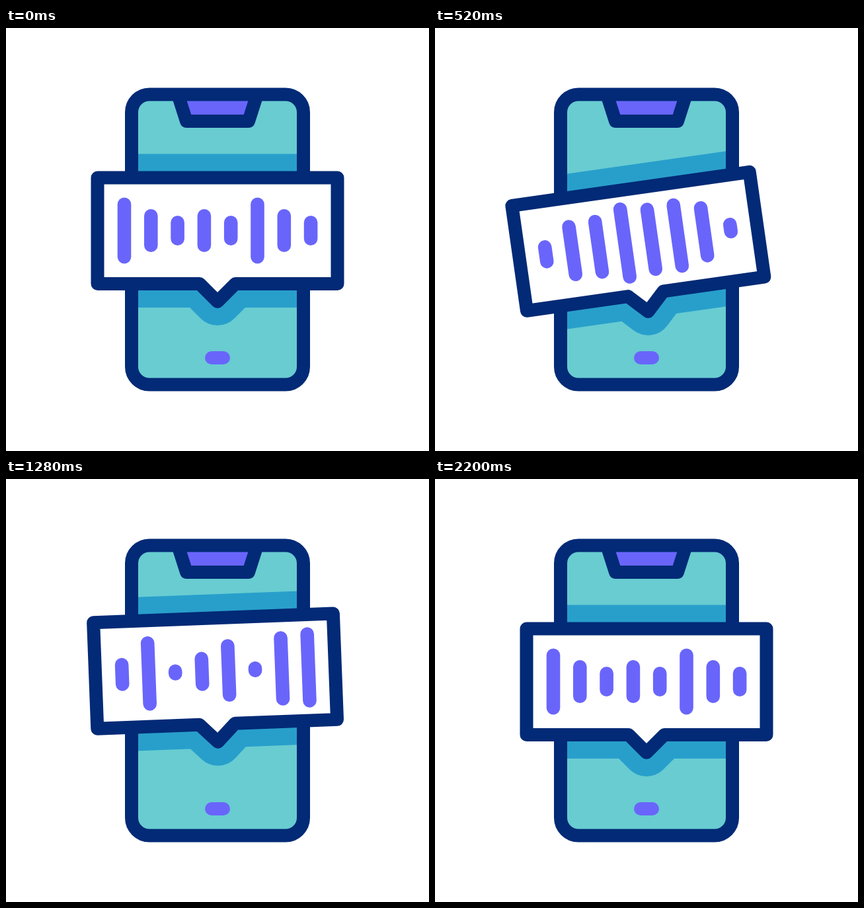
An HTML page with a canvas that plays this animation: 640x640 px, repeating every 2400 ms.

```html
<!DOCTYPE html>
<html lang="en">
<head>
<meta charset="utf-8">
<title>Voice message</title>
<style>
  html, body { margin: 0; width: 100%; height: 100%; overflow: hidden; background: #fff; }
  canvas { display: block; width: 640px; height: 640px; }
</style>
</head>
<body>
<canvas id="stage" width="640" height="640"></canvas>
<script>
const ctx = document.getElementById('stage').getContext('2d');
const NAVY = '#022a76', TEAL = '#68ccd1', BLUE = '#289fcb', PURPLE = '#6965fb';
const LOOP = 2400, REST = 2200;
const PIVOT = { x: 320, y: 396.5 };

// Swings and hops of the bubble: [time in ms, value] at each turning point.
const tilt = [[0, 0], [375, -18.2], [770, 15.8], [1104, -8], [1463, 4], [1750, 0]];
const drop = [[0, 0], [100, -20], [372, 53.5], [660, -20], [904, 54], [1210, -20],
              [1538, 15], [1890, 54], [2160, 0]];

// Each bar is a wave through its resting height; a negative count starts by rising.
const BAR_MID = 75, BAR_SWING = 51;
const restHeights = [100, 65, 45, 65, 45, 100, 65, 45];
const waveCounts = [2, -2, 2, -1, -2, 4, -2, 1];

function barHeight(i, t) {
  const phase = Math.acos((restHeights[i] - BAR_MID) / BAR_SWING);
  return BAR_MID + BAR_SWING * Math.cos(phase + 2 * Math.PI * waveCounts[i] * t / REST);
}

function valueAt(keys, t) {
  const next = keys.findIndex(key => key[0] > t);
  if (next < 0) return keys[keys.length - 1][1];
  const [t0, a] = keys[next - 1], [t1, b] = keys[next];
  const eased = (1 - Math.cos(Math.PI * (t - t0) / (t1 - t0))) / 2;
  return a + (b - a) * eased;
}

function polyline(points, closed) {
  const path = new Path2D();
  points.forEach(([x, y]) => path.lineTo(x, y));
  if (closed) path.closePath();
  return path;
}

function roundRect(x, y, w, h, r) {
  const path = new Path2D();
  path.roundRect(x, y, w, h, r);
  return path;
}

function fill(path, color) {
  ctx.fillStyle = color;
  ctx.fill(path);
}

function stroke(path, color, width = 20) {
  ctx.strokeStyle = color;
  ctx.lineWidth = width;
  ctx.stroke(path);
}

const body = roundRect(190, 100.5, 260, 439, 27);
const notch = polyline([[260, 100.5], [273, 141], [367, 141], [380, 100.5]]);
const button = roundRect(301, 489, 38, 20, 10);
const bubble = polyline([[138.5, 226.5], [501.5, 226.5], [501.5, 387], [347, 387],
                         [320, 414], [293, 387], [138.5, 387]], true);

function withBubblePose(t, paint) {
  ctx.save();
  ctx.translate(PIVOT.x, PIVOT.y + valueAt(drop, t));
  ctx.rotate(valueAt(tilt, t) * Math.PI / 180);
  ctx.translate(-PIVOT.x, -PIVOT.y);
  paint();
  ctx.restore();
}

function drawPhone(t) {
  fill(body, TEAL);
  ctx.save();
  ctx.clip(body);
  withBubblePose(t, () => {
    fill(bubble, BLUE);
    stroke(bubble, BLUE, 72);
  });
  ctx.restore();
  fill(notch, PURPLE);
  stroke(notch, NAVY);
  fill(button, PURPLE);
  stroke(body, NAVY);
}

function drawBubble(t) {
  withBubblePose(t, () => {
    fill(bubble, '#fff');
    stroke(bubble, NAVY);
    for (let i = 0; i < restHeights.length; i++) {
      const h = barHeight(i, t);
      fill(roundRect(168.7 + i * 40.3, 306.5 - h / 2, 20.6, h, 10.3), PURPLE);
    }
  });
}

function draw(t) {
  ctx.fillStyle = '#fff';
  ctx.fillRect(0, 0, 640, 640);
  ctx.lineJoin = 'round';
  drawPhone(t);
  drawBubble(t);
}

let start;
function tick(now) {
  start ??= now;
  draw(Math.min((now - start) % LOOP, REST));
  requestAnimationFrame(tick);
}
draw(0);
requestAnimationFrame(tick);
</script>
</body>
</html>
```
